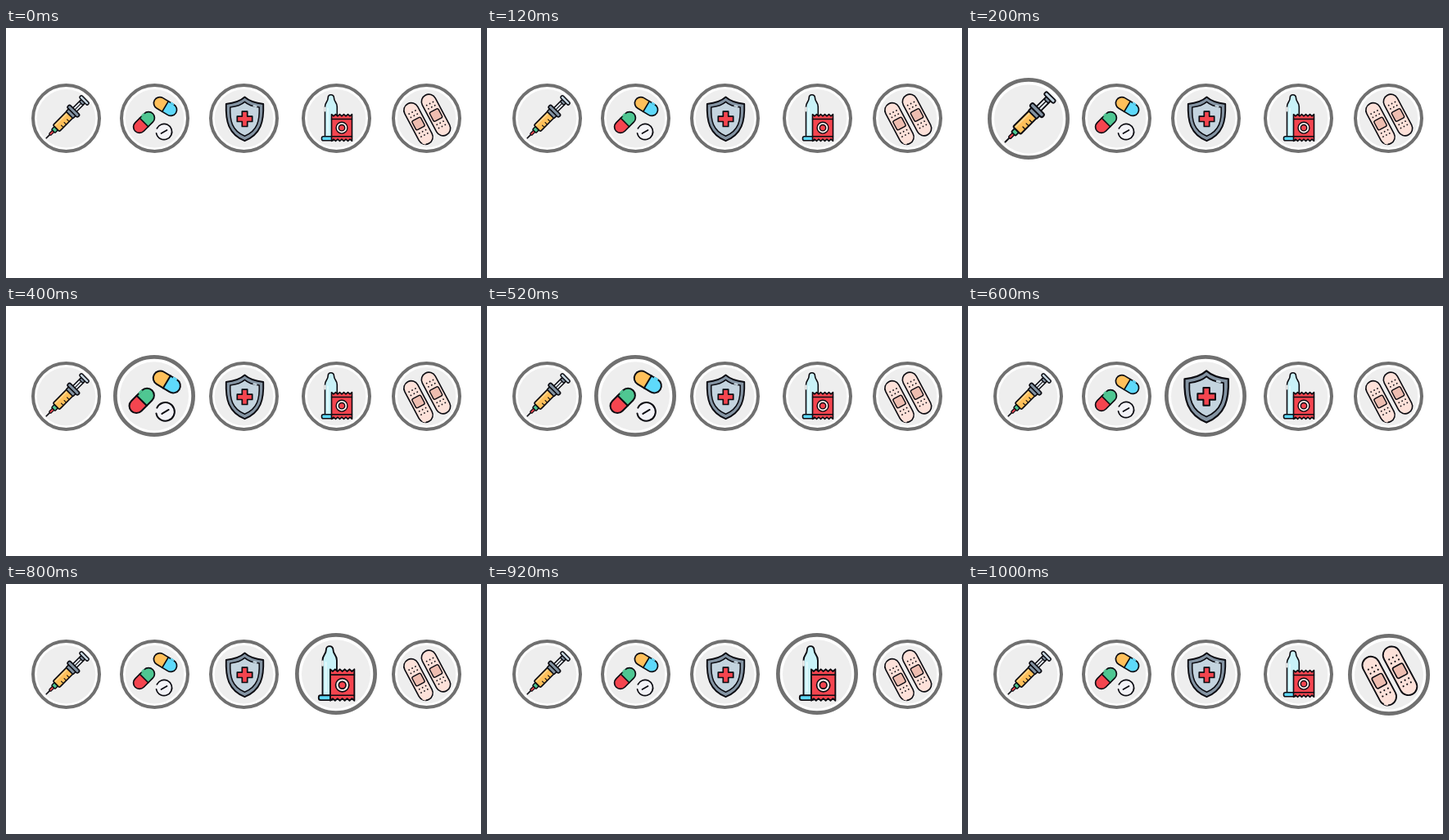
These frames come from a looping animation (580 by 306 pixels, 1.2 s). An HTML page with a canvas:

```html
<!DOCTYPE html>
<html lang="en">
<head>
<meta charset="utf-8">
<title>Health badges</title>
<style>
  html, body { margin: 0; width: 100%; height: 100%; overflow: hidden; background: #fff; }
  canvas { display: block; width: 580px; height: 306px; }
</style>
</head>
<body>
<canvas id="stage" width="580" height="306"></canvas>
<script>
const ctx = document.getElementById('stage').getContext('2d');
const STEP = 200;
const INK = '#0c0c12', RED = '#f4454f', GREEN = '#4fc792', ORANGE = '#ffc05a',
      CYAN = '#5ed9fb', STEEL = '#8494a3', PALE = '#c4d4df';

function paint(fill, stroke = INK, width = 1.7) {
  if (fill) { ctx.fillStyle = fill; ctx.fill(); }
  if (stroke) { ctx.strokeStyle = stroke; ctx.lineWidth = width; ctx.stroke(); }
}

function box(x, y, w, h, r, fill, stroke, width) {
  ctx.beginPath();
  ctx.roundRect(x, y, w, h, r);
  paint(fill, stroke, width);
}

function disc(x, y, r, fill, stroke, width) {
  ctx.beginPath();
  ctx.arc(x, y, r, 0, Math.PI * 2);
  paint(fill, stroke, width);
}

function line(x1, y1, x2, y2, color = INK, width = 1.7) {
  ctx.beginPath();
  ctx.moveTo(x1, y1);
  ctx.lineTo(x2, y2);
  paint(null, color, width);
}

function at(x, y, degrees, draw) {
  ctx.save();
  ctx.translate(x, y);
  ctx.rotate(degrees * Math.PI / 180);
  draw();
  ctx.restore();
}

function syringe() {
  at(0.5, -0.5, -45, () => {
    line(-35, 0, -27, 0, INK, 1.7);
    box(-29, -1.5, 7, 3, 1, RED, INK, 1.2);
    box(-23, -3, 5, 6, 1, GREEN, INK, 1.5);
    box(-18, -5.5, 25, 11, 1.5, ORANGE);
    line(-16, -3.4, 4, -3.4, '#ffd893', 1.5);
    for (let x = -11; x < 4; x += 5) line(x, 1.8, x, 4.8, INK, 1.1);
    box(5, -6, 5, 12, 1, STEEL);
    box(13, -3.2, 14, 6.4, 0, '#e8edf1', INK, 1.5);
    line(13, 0, 27, 0, INK, 1.2);
    box(9.5, -9, 4.6, 18, 2, STEEL);
    box(25, -3, 4, 6, 1, STEEL, INK, 1.4);
    box(28.5, -7, 4, 14, 1.8, PALE, INK, 1.5);
  });
}

function pill(x, y, angle, left, right) {
  at(x, y, angle, () => {
    box(-15.2, -7.4, 15.2, 14.8, [7.4, 0, 0, 7.4], left, null);
    box(0, -7.4, 15.2, 14.8, [0, 7.4, 7.4, 0], right, null);
    box(-15.2, -7.4, 30.4, 14.8, 7.4, null);
    line(0, -7.4, 0, 7.4);
    line(4, -7.4, 7, -7.4, right, 2);
  });
}

function pills() {
  pill(13, -14.5, 31, ORANGE, CYAN);
  pill(-13, 5, -45, RED, GREEN);
  disc(11.5, 16.5, 9.6, '#f3f3f7', null);
  ctx.beginPath();
  ctx.arc(11.5, 16.5, 9.6, -2.7, 2.95);
  paint(null);
  line(8, 18.6, 15, 14.4);
}

function shieldPath(k) {
  at(1, 0.5, 0, () => {
    ctx.scale(k, k);
    ctx.beginPath();
    ctx.moveTo(0, -26.5);
    ctx.bezierCurveTo(-6, -21, -14, -19, -22.7, -18);
    ctx.bezierCurveTo(-23.5, 3, -20, 19, 0, 27.2);
    ctx.bezierCurveTo(20, 19, 23.5, 3, 22.7, -18);
    ctx.bezierCurveTo(14, -19, 6, -21, 0, -26.5);
    ctx.closePath();
  });
}

function shield() {
  shieldPath(1);
  paint(STEEL, INK, 1.9);
  shieldPath(0.78);
  paint(PALE, INK, 1.5);
  line(12, -15.2, 15, -14.7, PALE, 2.2);
  const a = 3.2, b = 9.2;
  ctx.beginPath();
  [[-a, -b], [a, -b], [a, -a], [b, -a], [b, a], [a, a],
   [a, b], [-a, b], [-a, a], [-b, a], [-b, -a], [-a, -a]]
    .forEach(([x, y]) => ctx.lineTo(x + 1, y + 0.8));
  ctx.closePath();
  paint(RED);
}

function sheath() {
  ctx.beginPath();
  ctx.moveTo(-14, 23);
  ctx.lineTo(-14, -14);
  ctx.bezierCurveTo(-14, -20, -10.3, -20, -10.3, -25);
  ctx.bezierCurveTo(-10.3, -30, -3, -30, -3, -25);
  ctx.bezierCurveTo(-3, -20, 0.8, -20, 0.8, -14);
  ctx.lineTo(0.8, 23);
  ctx.closePath();
  paint('#c9f2f8', INK, 1.6);
  line(-14, -13, -14, -9, '#eeeeee', 2.2);
  line(-10.5, -12, -10.5, 18, '#e4fafd', 1.6);
  box(-18, 22.3, 15, 5, 2, CYAN, INK, 1.6);

  // wrapper with toothed top and bottom edges
  ctx.beginPath();
  for (let i = 0; i <= 10; i++) ctx.lineTo(-6 + i * 2.5, i % 2 ? -2.6 : -4.8);
  for (let i = 10; i >= 0; i--) ctx.lineTo(-6 + i * 2.5, i % 2 ? 25.6 : 27.8);
  ctx.closePath();
  paint(RED, INK, 1.6);
  line(-6, 1, 19, 1, INK, 1.4);
  line(-6, 22.3, 19, 22.3, INK, 1.4);
  disc(6.5, 11.7, 6.9, '#fff1ef', INK, 1.4);
  disc(6.5, 11.7, 3.7, RED, INK, 1.4);
}

function plaster(x, y) {
  at(x, y, 62, () => {
    box(-27.5, -9, 55, 18, 9, '#fde1d9', INK, 1.6);
    box(-6.3, -6, 12.6, 12, 2, '#eebdb0', INK, 1.4);
    for (const side of [-1, 1])
      for (let i = 0; i < 2; i++)
        for (let j = -1; j <= 1; j++)
          disc(side * (11 + i * 4.8), j * 4.4, 0.9, INK, null);
  });
}

function plasters() {
  plaster(-10, 6.5);
  plaster(11.5, -4);
  line(-4.2, 30.3, -1.8, 31, '#fde1d9', 2.2);
}

// resting centre x, enlarged centre, icon
const badges = [
  [73.5, 74, 111, syringe],
  [181.5, 181, 110, pills],
  [290.5, 290, 110, shield],
  [403.5, 403, 110, sheath],
  [513.5, 514, 111, plasters]
];

function badge([x, bigX, bigY, icon], active) {
  ctx.save();
  if (active) {
    ctx.translate(bigX, bigY);
    ctx.scale(100 / 85, 100 / 85);
  } else {
    ctx.translate(x, 110.5);
  }
  disc(0, 0, 40.5, '#fff', '#707070', 4);
  disc(0, 0.3, 35.8, '#eeeeee', null);
  icon();
  ctx.restore();
}

function render(now) {
  const active = Math.floor(now / STEP) % 6 - 1;
  ctx.fillStyle = '#fff';
  ctx.fillRect(0, 0, 580, 306);
  ctx.lineCap = ctx.lineJoin = 'round';
  badges.forEach((b, i) => badge(b, i === active));
}

const start = performance.now();
function tick() {
  render(performance.now() - start);
  requestAnimationFrame(tick);
}
tick();
</script>
</body>
</html>
```
